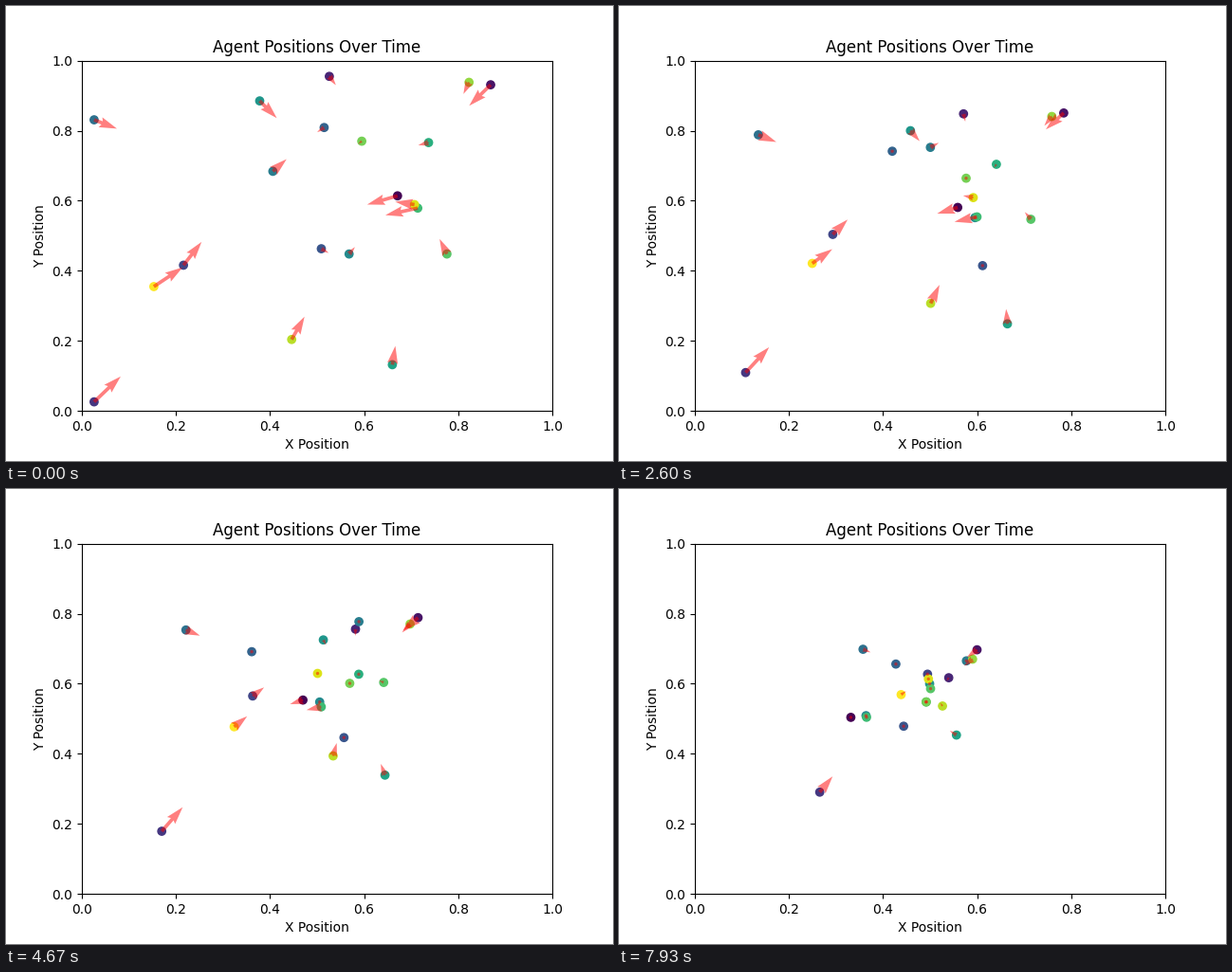
These frames come from a looping animation (640x480 px, 8 s). A matplotlib script:

```python
import numpy as np
import matplotlib.pyplot as plt
from matplotlib.animation import FuncAnimation

LOOP_MS = 8000
TICK_MS = 25          # finer than one step, so steps land on time
STEPS = 120
STEP_MS = LOOP_MS / STEPS
SPEED = 0.003

# Key points: where the agents start. All later places follow from the chase.
start = np.array([
    (.671, .614), (.869, .931), (.526, .955), (.026, .026), (.216, .416),
    (.509, .463), (.515, .809), (.026, .831), (.406, .684), (.568, .448),
    (.378, .885), (.660, .132), (.737, .766), (.714, .579), (.776, .448),
    (.595, .770), (.823, .938), (.446, .204), (.707, .589), (.153, .355)])

# Each agent heads for the midpoint between two others.
first = [3, 0, 12, 8, 10, 0, 7, 1, 1, 0, 14, 0, 2, 3, 2, 2, 0, 1, 4, 16]
second = [7, 19, 15, 14, 16, 11, 18, 19, 2, 13,
          18, 14, 5, 7, 13, 5, 12, 9, 10, 18]


def midpoint(pos):
    return (pos[first] + pos[second]) / 2


def advance(pos):
    """One step at constant speed; agents that arrive stay on their midpoint."""
    ahead = pos
    for _ in range(3):
        gap = midpoint(ahead) - pos
        dist = np.linalg.norm(gap, axis=1, keepdims=True)
        ahead = pos + gap * np.minimum(1, SPEED / np.maximum(dist, 1e-9))
    return ahead


track = [start]
while len(track) < STEPS:
    track.append(advance(track[-1]))

fig, ax = plt.subplots(figsize=(6.4, 4.8), dpi=100)
ax.set(xlim=(0, 1), ylim=(0, 1), xlabel="X Position", ylabel="Y Position",
       title="Agent Positions Over Time")

dots = ax.scatter(*start.T, c=np.arange(len(start)), cmap="viridis")
arrows = ax.quiver(*start.T, *(midpoint(start) - start).T,
                   color="red", alpha=0.5, scale=10)


def update(frame):
    # A small lead makes up for the tick grid.
    step = int((frame * TICK_MS + 17) / STEP_MS)
    pos = track[min(step, STEPS - 1)]
    dots.set_offsets(pos)
    arrows.set_offsets(pos)
    arrows.set_UVC(*(midpoint(pos) - pos).T)
    return dots, arrows


anim = FuncAnimation(fig, update, frames=LOOP_MS // TICK_MS, interval=TICK_MS,
                     repeat=True, repeat_delay=0)
plt.show()
```
